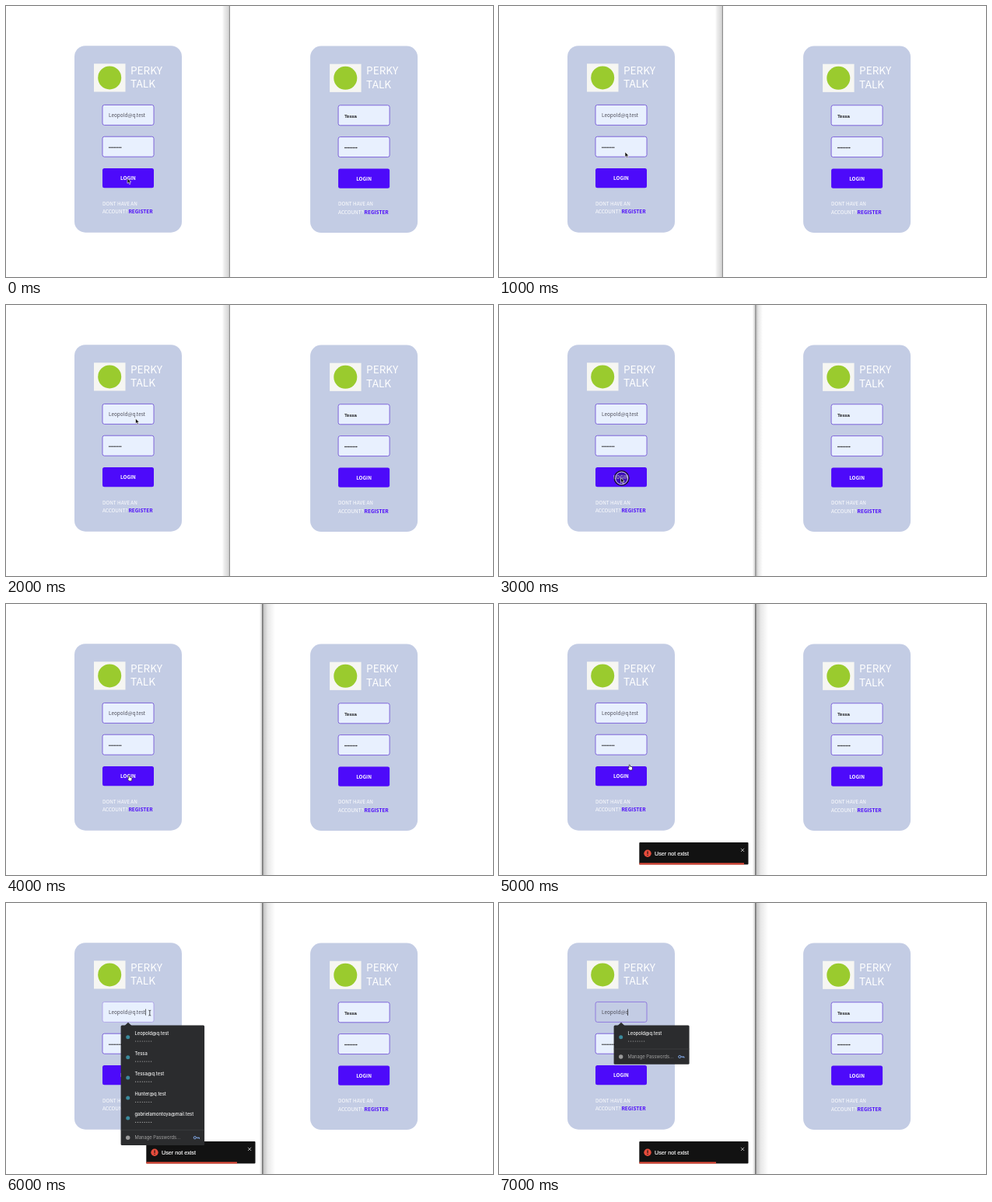
These frames come from a looping animation (626x349 px, 8000 ms). An HTML page:

```html
<!DOCTYPE html>
<html lang="en">
<head>
<meta charset="utf-8">
<title>Chat login</title>
<style>
html, body { margin: 0; width: 100%; height: 100%; overflow: hidden; background: #fff; }
svg { display: block; width: 626px; height: 349px; }
text { white-space: pre; }
.form { font-family: "Noto Sans CJK JP", "Noto Sans CJK SC", "Noto Sans", sans-serif; font-size: 6.4px; }
.thin { font-weight: 300; }
.bold { font-weight: 700; }
.ui { font-family: "Liberation Sans", Arial, sans-serif; font-size: 6px; }
.menu { font-family: Inter, Roboto, sans-serif; font-size: 5.8px; font-weight: 500; }
</style>
</head>
<body>
<svg id="stage" viewBox="0 0 626 349">
  <defs>
    <linearGradient id="toLeft">
      <stop offset="0" stop-color="#fff"/><stop offset=".25" stop-color="#eee"/>
      <stop offset="1" stop-color="#d2d2d2"/>
    </linearGradient>
    <linearGradient id="toRight">
      <stop offset="0" stop-color="#bdbdbd"/><stop offset=".4" stop-color="#e8e8e8"/>
      <stop offset="1" stop-color="#fff"/>
    </linearGradient>
  </defs>
  <rect width="626" height="349" fill="#fff"/>
  <g id="divider"></g>
  <g id="cards"></g>
  <g id="toast"></g>
  <g id="menu"></g>
  <g id="pointer"></g>
</svg>
<script>
const STEP = 1000, COUNT = 8;
const EMAIL = "Leopold@q.test";
const LOGINS = [EMAIL, "Tessa", "Tessa@q.test", "Hunter@q.test", "gabrielamontoya@mail.test"];

const rect = (x, y, w, h, fill, r = 0, more = "") =>
  `<rect x="${x}" y="${y}" width="${w}" height="${h}" rx="${r}" fill="${fill}" ${more}/>`;
const circle = (x, y, r, fill, more = "") =>
  `<circle cx="${x}" cy="${y}" r="${r}" fill="${fill}" ${more}/>`;
const text = (x, y, s, fill, cls, more = "") =>
  `<text x="${x}" y="${y}" fill="${fill}" class="${cls}" ${more}>${s}</text>`;
const path = (d, stroke, w, fill = "none", more = "") =>
  `<path d="${d}" stroke="${stroke}" stroke-width="${w}" fill="${fill}" ${more}/>`;
const at = (x, y, body) => `<g transform="translate(${x} ${y})">${body}</g>`;
const dots = (x, y, gap, r, fill) =>
  Array.from({ length: 8 }, (_, i) => circle(x + i * gap, y, r, fill)).join("");
const field = (y, fill, edge) =>
  rect(124, y, 66, 26, fill, 2.5, `stroke="${edge}" stroke-width=".8"`);

function card(user, fill = "#e8f0fe", edge = "#6747d4") {
  return rect(88, 51.2, 138, 240.5, "#c3cce4", 14)
    + rect(113, 74.3, 40.5, 36.2, "#f6f6f2")
    + circle(133.2, 92.4, 15, "#9acb2e")
    + text(160, 87.5, "PERKY", "#fff", "form thin", 'style="font-size:13.6px"')
    + text(160, 105.3, "TALK", "#fff", "form thin", 'style="font-size:13.6px"')
    + field(127.4, fill, edge) + user
    + field(168.2, "#e8f0fe", "#6747d4") + dots(132.9, 182.2, 2.1, .8, "#161616")
    + rect(124, 209, 66, 25.3, "#4d0afa", 2.5)
    + text(157, 224.3, "LOGIN", "#fff", "form bold", 'text-anchor="middle"')
    + text(124, 256.6, "DONT HAVE AN", "#fff", "form thin")
    + text(124, 267.4, "ACCOUNT?", "#fff", "form thin")
    + text(157.5, 267.4, "REGISTER", "#4d0afa", "form bold");
}

function cards(i) {
  const typed = i === 7 ? EMAIL.slice(0, 9) : EMAIL;
  const caret = i === 6 ? 179 : i === 7 ? 165.3 : 0;
  const left = text(132, 142.8, typed, "#4a4a55", "form")
    + (caret ? rect(caret, 136.6, .7, 8, "#222") : "");
  const right = text(132, 143.3, "Tessa", "#111", "ui", 'stroke="#111" stroke-width=".12"');
  return card(left, i === 7 ? "none" : "#e8f0fe", i === 6 ? "#a99be8" : i === 7 ? "#8468dc" : "#6747d4")
    + at(303.1, .4, card(right));
}

function divider(i) {
  if (i < 3) return rect(278, 0, 9, 349, "url(#toLeft)") + rect(286.8, 0, 1.2, 349, "#8f8f8f");
  const w = i === 3 ? 9 : 16;
  return rect(326, 0, 3.5, 349, "url(#toLeft)")
    + rect(330, 0, w, 349, "url(#toRight)")
    + rect(329, 0, 1.6, 349, i === 3 ? "#989898" : "#777");
}

function toast(i) {
  if (i < 5) return "";
  return rect(180.3, 307, 140.2, 28.6, "#121212", 1)
    + rect(180.3, 333.5, 134.7 - 18 * (i - 5), 2.1, "#e74c3c")
    + circle(191, 321.3, 4.7, "#e74c3c")
    + rect(190.5, 318.4, 1.1, 3.7, "#121212") + rect(190.5, 323, 1.1, 1.1, "#121212")
    + text(200, 323.8, "User not exist", "#fff", "ui", 'style="font-size:7.2px" stroke="#fff" stroke-width=".15"')
    + path("M311 314.8l4.2 4.2m0 -4.2l-4.2 4.2", "#bbb", .9);
}

function menu(i) {
  if (i < 6) return "";
  const list = i === 6 ? LOGINS : LOGINS.slice(0, 1);
  const [w, h] = i === 6 ? [107.5, 154.5] : [97, 50.3];
  const foot = 157.5 + h - 9.8;
  const rows = list.map((name, n) => {
    const y = 168 + 26.1 * n;
    return circle(156.7, y + 4.7, 2.5, "#3b8a9c")
      + text(165.5, y + 2, name, "#f2f2f2", "menu")
      + dots(166.7, y + 10, 2.85, .6, "#b5b5b5");
  }).join("");
  const key = circle(1.7, 0, 1.6, "none", 'stroke="#8ab4f8" stroke-width=".9"')
    + path("M3.3 0H7.4V1.6M5.7 0V1.2", "#8ab4f8", .9);
  return path("M152.5 158L157 153.8L161.5 158Z", "none", 0, "#2b2c2e")
    + rect(147.6, 157.5, w, h, "#2b2c2e", 1.5)
    + rows
    + rect(147.6, foot - 10.3, w, .6, "#434446")
    + circle(156.7, foot, 2.7, "#9a9a9a")
    + text(165.5, foot + 2.1, "Manage Passwords...", "#a2a2a2", "menu", 'style="font-weight:400"')
    + at(147.6 + w - 14, foot, key);
}

const arrow = path("M0 0V6.6L1.6 5.2L2.7 7.8L3.9 7.3L2.8 4.8H4.8Z", "#fff", .6, "#111");
const hand = path("M-1.4 -3.4C-.7 -4 -.2 -3.4 -.1 -2.7L.1 -1.3L2.3 -.9Q3.1 -.6 3 .4L2.5 3.4H-.9L-2.7 .8Q-2.6 -.1 -1.6 .4Z",
  "#222", .7, "#fff");
const beam = path("M-1.5 -3.4Q0 -3.4 0 -2.6V2.6Q0 3.4 -1.5 3.4M1.5 -3.4Q0 -3.4 0 -2.6M0 2.6Q0 3.4 1.5 3.4", "#222", .8);
const ring = circle(157.6, 223, 9.4, "#2a1266", 'fill-opacity=".45" stroke="#17131f" stroke-width="1.2"')
  + circle(157.6, 223, 8, "none", 'stroke="#e6e2f0" stroke-width=".9"');

function pointer(i) {
  return [
    () => at(156, 221.8, arrow),
    () => at(162, 188, arrow),
    () => at(166.5, 146.2, arrow),
    () => ring + at(156.5, 222.3, arrow),
    () => at(159, 224.5, hand),
    () => at(168.6, 210.6, hand),
    () => at(184.8, 141.6, beam),
    () => ""
  ][i]();
}

const layers = { divider, cards, toast, menu, pointer };
let shown = -1;

function draw(ms) {
  const i = Math.floor(ms / STEP) % COUNT;
  if (i === shown) return;
  shown = i;
  for (const id in layers) document.getElementById(id).innerHTML = layers[id](i);
}

const start = performance.now();
function tick() {
  draw(performance.now() - start);
  requestAnimationFrame(tick);
}
tick();
</script>
</body>
</html>
```
